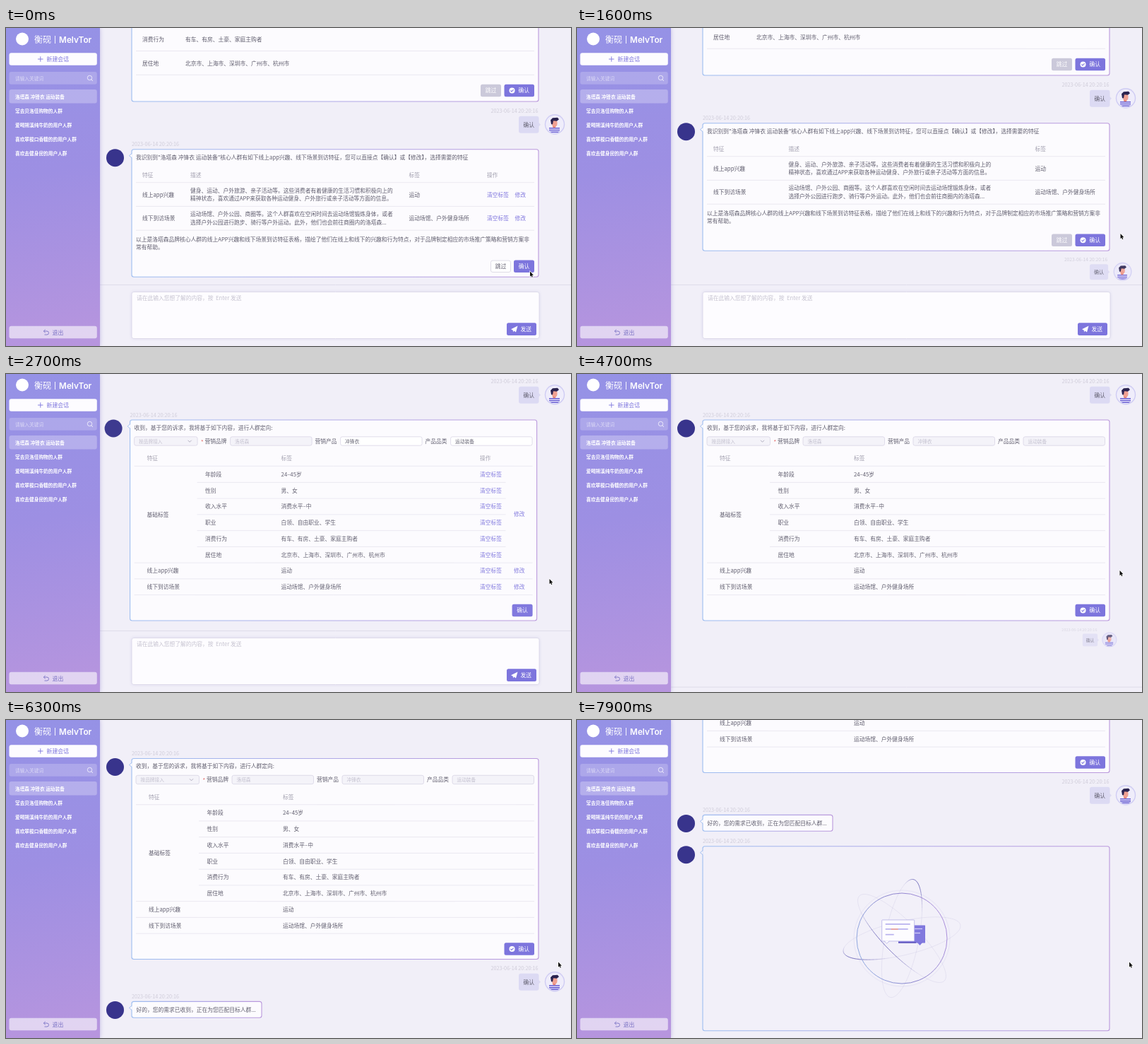
Recreate the animation shown at these times as an HTML page with a canvas. Size 800x450 px, loop 8000 ms.

```html
<!DOCTYPE html>
<html lang="zh-CN">
<head>
<meta charset="utf-8">
<title>会话</title>
<style>
html, body { margin: 0; width: 100%; height: 100%; overflow: hidden; background: #f1eff8; }
canvas { display: block; width: 800px; height: 450px; }
</style>
</head>
<body>
<canvas id="stage"></canvas>
<script>
const canvas = document.getElementById('stage');
const dpr = window.devicePixelRatio || 1;
canvas.width = 800 * dpr;
canvas.height = 450 * dpr;
const c = canvas.getContext('2d');

const LOOP = 8000;
const CJK = '"Noto Sans CJK SC", "Noto Sans CJK", "Noto Sans", sans-serif';
const INK = '#605e6e', PALE = '#a3a1b0', LINK = '#8279de', PURPLE = '#7d75dd', RULE = '#e6e4ee';
const BG = '#f1eff8', FAINT = '#cfccd9', CARD = '#fcfbfe';
const BRAND = '洛塔森';

const clamp = v => Math.max(0, Math.min(1, v));
const progress = (t, start, len) => clamp((t - start) / len);
const out = p => 1 - (1 - p) * (1 - p);
const inOut = p => p * p * (3 - 2 * p);

// Eased value through [time, value] points
function track(keys, t) {
  let v = keys[0][1];
  for (let i = 1; i < keys.length; i++) {
    const [t0, v0] = keys[i - 1], [t1, v1] = keys[i];
    if (t >= t0) v = v0 + (v1 - v0) * inOut(progress(t, t0, t1 - t0));
  }
  return v;
}

function text(s, x, y, color = INK, size = 7.75, weight = 400, family = CJK) {
  c.font = `${weight} ${size}px ${family}`;
  c.fillStyle = color;
  c.fillText(s, x, y + size * 0.38);
}

function box(x, y, w, h, r, fill, stroke, width = 1) {
  c.beginPath();
  c.roundRect(x, y, w, h, r);
  if (fill) { c.fillStyle = fill; c.fill(); }
  if (stroke) { c.strokeStyle = stroke; c.lineWidth = width; c.stroke(); }
}

function line(points, color, width = 0.8) {
  c.beginPath();
  points.forEach(([x, y], i) => i ? c.lineTo(x, y) : c.moveTo(x, y));
  c.strokeStyle = color;
  c.lineWidth = width;
  c.stroke();
}

const rule = (x0, x1, y) => line([[x0, y], [x1, y]], RULE);

function disc(x, y, r, fill) {
  c.beginPath();
  c.arc(x, y, r, 0, 7);
  c.fillStyle = fill;
  c.fill();
}

function ring(x, y, r, stroke, width) {
  c.beginPath();
  c.arc(x, y, r, 0, 7);
  c.strokeStyle = stroke;
  c.lineWidth = width;
  c.stroke();
}

function shape(points, fill) {
  c.beginPath();
  points.forEach(([x, y]) => c.lineTo(x, y));
  c.closePath();
  c.fillStyle = fill;
  c.fill();
}

function shadow(color, blur) {
  c.shadowColor = color;
  c.shadowBlur = blur * dpr;
}

function sideGradient(x0, x1) {
  const g = c.createLinearGradient(x0, 0, x1, 0);
  g.addColorStop(0, '#9dbdf0');
  g.addColorStop(0.45, '#aeaae8');
  g.addColorStop(1, '#ba98dc');
  return g;
}

const stamp = (x, y) => text('2023-06-14 20:20:16', x, y, FAINT, 7.25);

// Bot message: date, avatar disc, framed card
function botCard(y, h, w = 576, fill = CARD) {
  stamp(178, y - 7);
  disc(154.5, y + 12, 12.5, '#38348c');
  box(178, y, w, h, 3, fill, sideGradient(178, 178 + w), 1.1);
  shape([[178.7, y + 6], [174.8, y + 9], [178.7, y + 12]], fill);
  line([[178, y + 6], [174.5, y + 9], [178, y + 12]], '#9dbdf0', 0.9);
}

function avatar(x, y) {
  disc(x, y, 14.2, '#cfccf3');
  disc(x, y, 12.8, '#efedfb');
  c.save();
  c.beginPath();
  c.arc(x, y, 12.3, 0, 7);
  c.clip();
  box(x - 8, y + 4, 15, 12, 5, '#f4f3fe');
  for (let i = 0; i < 3; i++) line([[x - 8, y + 5.5 + i * 2.8], [x + 7, y + 5.5 + i * 2.8]], '#675cd2', 1.6);
  box(x - 3, y - 1, 4.5, 6, 2, '#e98678');
  box(x - 4, y - 6, 7.5, 9, 3.5, '#f0a192');
  shape([[x - 5, y], [x - 6, y - 6], [x - 3, y - 9], [x + 4, y - 9.5], [x + 6, y - 7], [x + 3, y - 4.5], [x - 2, y - 5], [x - 3, y]], '#2b2450');
  c.restore();
}

function userMessage(y) {
  stamp(686.5, y - 19.5);
  box(726, y - 12, 28.5, 24, 3, '#dcdaf3');
  shape([[754, y - 3], [757, y], [754, y + 3]], '#dcdaf3');
  text('确认', 732.5, y);
  avatar(777, y - 0.5);
}

function confirm(y, done, dark) {
  const x = done ? 705.5 : 719;
  box(x, y - 8.7, 748 - x, 17.4, 2.5, dark ? '#655cc9' : PURPLE);
  text('确认', done ? 725.5 : 725.7, y, '#fff');
  if (done) {
    disc(716.5, y, 4, '#fff');
    line([[714.5, y], [716, y + 1.5], [718.6, y - 1.3]], PURPLE, 1.1);
  }
}

function skip(y, done) {
  const x = done ? 672 : 686;
  if (done) box(x, y - 8.7, 29, 17.4, 2.5, '#cbc9da');
  else box(x + 0.5, y - 8.2, 28, 16.4, 2.5, '#fff', '#d6d4e0', 0.8);
  text('跳过', x + 6.7, y, done ? '#fff' : INK);
}

const CITIES = '北京市、上海市、深圳市、广州市、杭州市';
const SPEND = '有车、有房、土豪、家庭主购者';

function firstCard() {
  botCard(-180, 284);
  text('消费行为', 193, 16);
  text(SPEND, 254, 16);
  rule(184, 748, 32.5);
  text('居住地', 193, 50);
  text(CITIES, 254, 50);
  rule(184, 748, 66.3);
  skip(88.5, true);
  confirm(88.5, true);
}

function featureCard(t) {
  const done = t >= 600;
  const [desc, tag] = done ? [299.5, 648.5] : [261, 570.5];
  botCard(171.7, 180.5);
  text(`我识别到"${BRAND} 冲锋衣 运动装备"核心人群有如下线上app兴趣、线下场景到访特征，您可以直接点【确认】或【修改】，选择需要的特征`, 184, 183.5);
  text('特征', 193, 208, PALE);
  text('描述', desc, 208, PALE);
  text('标签', tag, 208, PALE);
  if (!done) text('操作', 681, 208, PALE);
  const rows = [
    ['线上app兴趣', '健身、运动、户外旅游、亲子活动等。这些消费者有着健康的生活习惯和积极向上的',
      '精神状态，喜欢通过APP来获取各种运动健身、户外旅行或亲子活动等方面的信息。', '运动'],
    ['线下到访场景', '运动场馆、户外公园、商圈等。这个人群喜欢在空闲时间去运动场馆锻炼身体，或者',
      `选择户外公园进行跑步、骑行等户外运动。此外，他们也会前往商圈内的${BRAND}...`, '运动场馆、户外健身场所']
  ];
  rule(184, 748, 218.7);
  rows.forEach(([name, a, b, label], i) => {
    const y = 235.7 + i * 33.8;
    text(name, 193, y);
    text(a, desc, y - 6);
    text(b, desc, y + 5.3);
    text(label, tag, y);
    if (!done) {
      text('清空标签', 681, y, LINK);
      text('修改', 720.5, y, LINK);
    }
    rule(184, 748, y + 16.7);
  });
  text(`以上是${BRAND}品牌核心人群的线上APP兴趣和线下场景到访特征表格，描绘了他们在线上和线下的兴趣和行为特点，对于品牌制定相应的市场推广策略和营销方案非`, 184, 298.7);
  text('常有帮助。', 184, 309.8);
  skip(337.3, done);
  confirm(337.3, done, t > 350 && t < 600);
}

function field(x, w, y, s, locked) {
  box(x, y - 6.2, w, 12.4, 2.5, locked ? '#f4f3f9' : '#fff', '#d8d5e5', 0.8);
  text(s, x + 6.5, y, locked ? '#c3c0cf' : INK, 6.7);
}

function summaryCard(t) {
  const done = t >= 3900, top = 420, y0 = 355;
  botCard(top, 284);
  text('收到，基于您的诉求，我将基于如下内容，进行人群定向:', 184, y0 + 76);
  const fy = y0 + 95;
  field(184, 89.5, fy, '按品牌接入', true);
  line([[260, fy - 1.2], [262.5, fy + 1.3], [265, fy - 1.2]], '#a9a6b8', 0.9);
  text('*', 278.5, fy + 1, '#e2605e');
  text('营销品牌', 284, fy);
  field(320, 115.5, fy, BRAND, true);
  text('营销产品', 440, fy);
  field(476, 115.5, fy, '冲锋衣', done);
  text('产品品类', 596, fy);
  field(632, 115.5, fy, '运动装备', done);

  text('特征', 202, y0 + 119.5, PALE);
  text('标签', 392, y0 + 119.5, PALE);
  if (!done) text('操作', 673.5, y0 + 119.5, PALE);
  rule(184, 748, y0 + 130.3);
  const rows = [['年龄段', '24–45岁'], ['性别', '男、女'], ['收入水平', '消费水平–中'],
    ['职业', '白领、自由职业、学生'], ['消费行为', SPEND], ['居住地', CITIES],
    ['线上app兴趣', '运动'], ['线下到访场景', '运动场馆、户外健身场所']];
  rows.forEach(([name, value], i) => {
    const y = y0 + 142 + i * 22.75, inner = i < 6;
    text(name, inner ? 284.5 : 202, y);
    text(value, 392, y);
    if (!done) {
      text('清空标签', 673.5, y, LINK);
      if (!inner) text('修改', 721.5, y, LINK);
    }
    if (i < 5) rule(273, done ? 748 : 710, y + 11.4);
    else rule(184, 748, y + 11.4);
  });
  text('基础标签', 202, y0 + 199);
  if (!done) text('修改', 721.5, y0 + 198, LINK);
  confirm(y0 + 334.5, done, t > 3650 && t < 3900);
}

function waitCard() {
  botCard(763.9, 22.8, 184);
  text('好的，您的需求已收到，正在为您匹配目标人群...', 184.5, 775.4);
}

// Tilted orbit with a glowing quarter arc; angles in degrees
function orbit(tilt, arc, t, strength) {
  const a = 85, b = 24, rad = Math.PI / 180;
  const ux = Math.cos(tilt * rad), uy = Math.sin(tilt * rad);
  const at = deg => {
    const p = a * Math.cos(deg * rad), q = b * Math.sin(deg * rad);
    return [p * ux + q * uy, p * uy - q * ux];
  };
  c.beginPath();
  for (let d = 0; d <= 360; d += 4) c.lineTo(...at(d));
  c.strokeStyle = 'rgba(165,160,205,0.26)';
  c.lineWidth = 0.7;
  c.stroke();
  const mid = arc + (t - 7900) / 1800 * 360;
  for (let d = -46; d < 46; d += 4) {
    const glow = Math.cos(d / 46 * Math.PI / 2);
    line([at(mid + d), at(mid + d + 4.3)], `rgba(98,92,180,${glow * strength})`, 0.5 + glow * 0.5);
  }
}

function chatIcon(t) {
  const lift = -2.75 * (1 - Math.cos((t - 7000) / 1800 * 2 * Math.PI));
  c.save();
  c.translate(0, lift);
  box(-5, -13, 38, 25, 0.5, PURPLE);
  shape([[22, 11.5], [29, 11.5], [25.5, 15.5]], PURPLE);
  for (let x = 19; x < 33; x += 2) line([[x, -12], [x, 11]], 'rgba(255,255,255,0.13)', 0.6);
  line([[18, -8], [29, -8]], '#d5d0f7', 1.2);
  line([[18, -2], [26, -2]], '#d5d0f7', 1.2);
  line([[-5, 11.5], [20, 11.5]], '#5c53b8', 1.4);
  c.translate(-0.3, lift * 0.1);
  box(-28, -20, 46, 30, 0.8, '#fdfcff', '#b4afe6', 0.8);
  shape([[-24.5, 9.5], [-21, 13], [-17.5, 9.5]], '#fdfcff');
  line([[-24.5, 10], [-21, 13.2], [-17.5, 10]], '#b4afe6', 0.8);
  line([[-23, -14], [12, -14]], '#b9b2ee', 1.7);
  line([[-23, -7], [9, -7]], '#b9b2ee', 1.7);
  line([[-23, 0.7], [-11, 0.7]], '#b9b2ee', 1.7);
  c.globalAlpha *= progress(t, 7400, 300);
  line([[-15, -7], [-5, -7]], '#eda39a', 1.7);
  c.restore();
}

function loaderCard(t) {
  botCard(808.2, 261, 576, '#f2f0f9');
  c.save();
  c.translate(460, 938.5);
  const rise = 0.1 + 0.65 * progress(t, 7100, 500);
  ring(0, 0, 68, 'rgba(165,160,215,0.2)', 0.8);
  orbit(-79, -18, t, 0.75);
  orbit(167, 27, t, rise);
  orbit(225, 80, t, rise);
  const g = c.createLinearGradient(-64, 20, 64, -20);
  g.addColorStop(0, '#8fa9e0');
  g.addColorStop(0.5, '#8a83cc');
  g.addColorStop(1, '#ab8edb');
  ring(0, 0, 64, g, 1);
  chatIcon(t);
  c.restore();
}

// Growing entry around (x, y)
function grow(p, x, y, draw) {
  if (p <= 0) return;
  const e = out(p), s = 0.2 + 0.8 * e;
  c.save();
  c.globalAlpha = e;
  c.translate(x, y);
  c.scale(s, s);
  c.translate(-x, -y);
  draw();
  c.restore();
}

// Entry from the left with a fade
function slide(p, draw) {
  if (p <= 0) return;
  const e = out(p);
  c.save();
  c.globalAlpha = e;
  c.translate(-90 * (1 - e), 0);
  draw();
  c.restore();
}

const SCROLL = [[0, 0], [1100, 0], [1400, 37], [1900, 37], [2350, 355], [5500, 355], [5750, 365.5], [6380, 365.5], [6680, 629.5]];

function chat(t) {
  c.save();
  c.translate(0, -track(SCROLL, t));
  firstCard();
  userMessage(136.7);
  featureCard(t);
  // The second reply leaves when the view moves on
  if (t < 5500) grow(progress(t, 1400, 300), 726, 357, () => userMessage(384.7));
  slide(progress(t, 2450, 300), () => summaryCard(t));
  grow(progress(t, 4570, 300), 686, 717, () => userMessage(736.3));
  slide(progress(t, 5550, 280), waitCard);
  slide(progress(t, 6660, 280), () => loaderCard(t));
  c.restore();
}

function composer(t) {
  const dy = 95 * inOut(progress(t, 4500, 270));
  if (dy >= 95) return;
  c.save();
  c.translate(0, dy);
  c.fillStyle = BG;
  c.fillRect(133, 363, 667, 90);
  line([[133, 363.5], [800, 363.5]], '#dfdcea', 1);
  c.save();
  shadow('rgba(140,130,200,0.22)', 4);
  box(178, 373.5, 577, 66, 3, '#fdfcff');
  c.restore();
  box(178, 373.5, 577, 66, 3, null, '#d9d6e8', 0.8);
  text('请在此输入您想了解的内容，按  Enter 发送', 185, 382, '#c6c3d0');
  box(709, 417.3, 42, 17.6, 2.5, PURPLE);
  shape([[715, 426.3], [724.5, 421.5], [722, 430.5], [719.3, 428.6], [718, 430.6], [717.8, 427.7]], '#fff');
  text('发送', 728.5, 426, '#fff');
  c.restore();
}

function sidebar() {
  const g = c.createLinearGradient(30, 0, 100, 450);
  g.addColorStop(0, '#9592e6');
  g.addColorStop(0.45, '#9d8fe3');
  g.addColorStop(1, '#b795de');
  c.save();
  shadow('rgba(130,115,200,0.45)', 6);
  c.fillStyle = g;
  c.fillRect(0, 0, 133, 450);
  c.restore();

  disc(23, 15.5, 9, '#fff');
  text('衡砚', 40, 16.5, '#fff', 12, 500);
  line([[69.5, 11], [69.5, 22]], '#fff', 0.9);
  text('MelvTor', 75, 16.5, '#fff', 11.8, 600, 'Inter, sans-serif');

  box(4.5, 35.3, 124.3, 17.4, 3, '#fdfcff');
  line([[45, 44], [52.5, 44]], PURPLE, 0.9);
  line([[48.8, 40.3], [48.8, 47.7]], PURPLE, 0.9);
  text('新建会话', 57.5, 44, PURPLE, 7.9);

  box(4.5, 62, 124.3, 17.8, 3, 'rgba(255,255,255,0.2)');
  text('请输入关键词', 13, 71, 'rgba(255,255,255,0.55)', 6.7);
  ring(118.5, 70.5, 3.2, '#f1effc', 0.9);
  line([[120.8, 72.8], [123, 75]], '#f1effc', 0.9);

  box(4.5, 87, 124.3, 19.4, 3, 'rgba(255,255,255,0.27)');
  [`${BRAND} 冲锋衣 运动装备`, '常去贝洛佳购物的人群', '爱喝朔溪纯牛奶的用户人群',
    '喜欢翠梭口香糖的的用户人群', '喜欢去健身房的用户人群']
    .forEach((s, i) => text(s, 13, 97 + i * 20, '#fff', 6.7, 700));

  box(4.5, 421.7, 124.3, 17.6, 3, 'rgba(255,255,255,0.6)');
  line([[55.7, 426.8], [53.3, 429], [55.7, 431.2]], '#7a72c4', 0.9);
  c.beginPath();
  c.moveTo(53.5, 429);
  c.lineTo(58, 429);
  c.arc(58, 431.5, 2.5, -Math.PI / 2, Math.PI / 2);
  c.lineTo(54.5, 434);
  c.stroke();
  text('退出', 65.5, 430.7, '#7a72c4', 7.9);
}

const CURSOR_X = [[0, 742], [450, 742], [1000, 769.5], [3000, 769.5], [3450, 733], [3900, 733], [4400, 768.5], [4800, 768.5], [5400, 782]];
const CURSOR_Y = [[0, 344.5], [450, 344.5], [1000, 291.5], [2600, 290], [3000, 290], [3450, 335], [3900, 335], [4400, 278], [4800, 278], [5400, 342.5]];

function cursor(t) {
  c.save();
  c.translate(track(CURSOR_X, t), track(CURSOR_Y, t));
  c.beginPath();
  [[0, 0], [0, 7.2], [1.6, 5.8], [2.7, 8.2], [3.8, 7.7], [2.8, 5.3], [4.9, 5.2]].forEach(p => c.lineTo(...p));
  c.closePath();
  c.strokeStyle = '#fff';
  c.lineWidth = 1.2;
  c.stroke();
  c.fillStyle = '#111';
  c.fill();
  c.restore();
}

function frame() {
  const t = performance.now() % LOOP;
  c.setTransform(dpr, 0, 0, dpr, 0, 0);
  c.fillStyle = BG;
  c.fillRect(0, 0, 800, 450);
  chat(t);
  composer(t);
  sidebar();
  cursor(t);
  requestAnimationFrame(frame);
}
requestAnimationFrame(frame);
</script>
</body>
</html>
```
